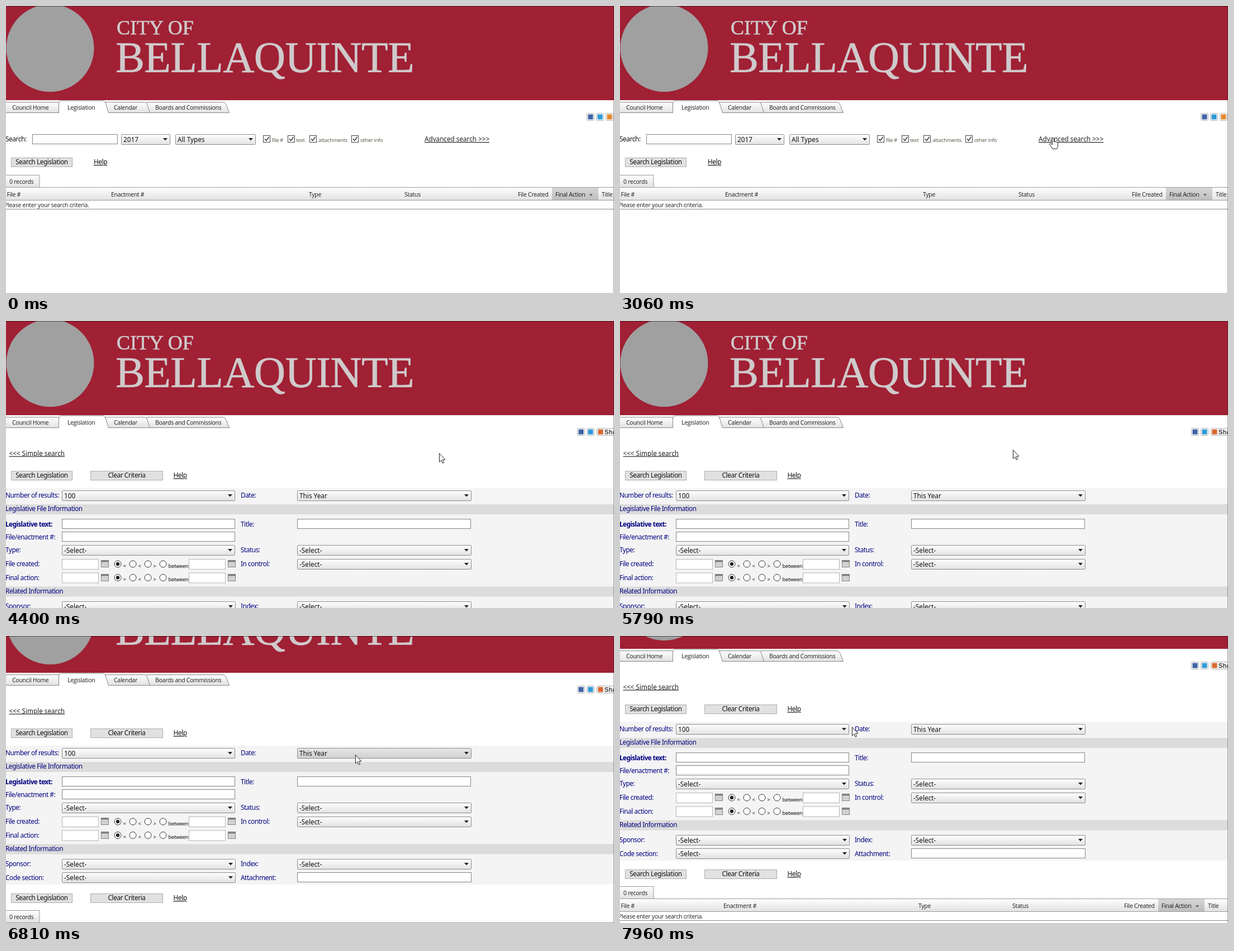
An HTML page that plays this animation: 1088 px wide and 515 px high, repeating every 8000 ms.

```html
<!DOCTYPE html>
<html lang="en">
<head>
<meta charset="utf-8">
<title>Legislation search</title>
<style>
html, body { margin: 0; width: 100%; height: 100%; overflow: hidden; background: #fff; }
svg { display: block; width: 100vw; height: 100vh; }
text { white-space: pre; }
.ui { font: 11.8px "Noto Sans", sans-serif; letter-spacing: -.033em; fill: #111; }
.label { fill: #000080; letter-spacing: -.038em; }
.bold { font-weight: 700; letter-spacing: -.05em; }
.value { letter-spacing: 0; }
.link { font-size: 11.7px; letter-spacing: 0; text-decoration: underline; fill: #222; }
.help { text-decoration: underline; }
.small { font-size: 9.4px; fill: #5c604f; }
.tiny { font-size: 9.4px; }
.mid { text-anchor: middle; }
.grid { font: 10.5px "Open Sans", sans-serif; letter-spacing: -.025em; fill: #1c1c1c; }
.banner { font-family: "Liberation Serif", serif; fill: #cfcacb; stroke: #cfcacb; stroke-width: .7; }
.share { font: 11px "Liberation Sans", sans-serif; letter-spacing: .06em; fill: #222; stroke: #222; stroke-width: .25; }
</style>
</head>
<body>
<svg id="stage" viewBox="0 0 1088 515" preserveAspectRatio="none">
  <defs>
    <linearGradient id="face" x2="0" y2="1"><stop stop-color="#fefefe"/><stop offset="1" stop-color="#e2e2e2"/></linearGradient>
    <linearGradient id="hover" x2="0" y2="1"><stop stop-color="#e6e6e6"/><stop offset="1" stop-color="#d0d0d0"/></linearGradient>
    <linearGradient id="sorted" x2="0" y2="1"><stop stop-color="#d6d6d6"/><stop offset="1" stop-color="#bebebe"/></linearGradient>
  </defs>
  <rect width="1088" height="515" fill="#fff"/>
  <g id="page">
    <g id="top"></g>
    <g id="simple"></g>
    <g id="advanced"></g>
  </g>
  <path d="M0 .5H1088" stroke="#000" stroke-opacity=".5"/>
  <path d="M1087.5 0V515" stroke="#000" stroke-opacity=".35"/>
  <g id="cursor" fill="#fff" stroke="#222" stroke-linejoin="round">
    <path id="arrow" d="M.5 .5V16L4 12.7 6.2 18 8.6 17 6.4 11.8H11z"/>
    <path id="hand" d="M-1.5 12V1.5a1.5 1.5 0 0 1 3 0V7q1.2-1 2.5 0 1.2-.7 2.4.4 1.4-.5 2.3 1V13q0 3-2 6.3H-1q-1-3.3-5-7.3-.8-2 1-2.2 2 .3 3.5 2.2z"/>
  </g>
</svg>
<script>
const $ = id => document.getElementById(id);

const text = (x, y, s, cls = 'ui') =>
  `<text x="${x}" y="${y}" class="${cls}">${s.replace(/</g, '&lt;').replace(/>/g, '&gt;')}</text>`;
const rect = (x, y, w, h, fill, stroke = 'none', extra = '') =>
  `<rect x="${x}" y="${y}" width="${w}" height="${h}" fill="${fill}" stroke="${stroke}" ${extra}/>`;
const path = (d, fill = 'none', stroke = '#888') =>
  `<path d="${d}" fill="${fill}" stroke="${stroke}"/>`;

const label = (x, y, s, cls = '') => text(x, y + 4, s, 'ui label ' + cls);
const field = (x, y, w, h = 17, stroke = '#858585') => rect(x + .5, y - 8.5, w, h, '#fff', stroke);
const caret = (x, y) => path(`M${x} ${y}h8l-4 4.5z`, '#222', 'none');
const select = (x, y, w, s, id = 'menu') =>
  rect(x + .5, y - 8.5, w, 18, 'url(#face)', '#8c8c8c', `rx="1" data-id="${id}"`) +
  text(x + 4, y + 5, s, 'ui value') + caret(x + w - 12, y - 2);
const button = (x, y, w, s) =>
  rect(x + .5, y - 7.5, w - 1, 16, '#e1e1e1', '#adadad') + text(x + w / 2, y + 4.3, s, 'ui mid');

const check = (x, s, tx) =>
  rect(x + .5, 232.5, 12, 12, '#fff', '#444') +
  `<path d="M${x + 3} 238.5l2.8 3L${x + 10.5} 235" fill="none" stroke="#222" stroke-width="1.3"/>` +
  text(tx, 244, s, 'ui small');
const radio = (x, y, s, on) =>
  `<circle cx="${x}" cy="${y}" r="6" fill="#fff" stroke="#333"/>` +
  (on ? `<circle cx="${x}" cy="${y}" r="3.2" fill="#222"/>` : '') +
  text(x + 9.5, y + 6.5, s, 'ui tiny');

const calendar = (x, y) => {
  let s = rect(x + .5, y - 6.5, 13, 12, '#f8f8f8', '#777') + rect(x + 1, y - 6, 12, 3, '#888');
  for (let i = 0; i < 12; i++)
    s += rect(x + 2 + i % 4 * 2.8, y - 1.8 + (i >> 2) * 2.3, 1.9, 1.4, '#999');
  return s;
};

const badge = (x, color, w = 13) =>
  rect(x + .5, 192.5, w, 13, '#f6f6f6', '#b5b5b5', 'rx="2"') + rect(x + 2.5, 194.5, 9, 9, color);

function grid(y, [enact, type, status, created, action, title]) {
  const head = (x, s) => text(x, y + 16, s, 'grid');
  return rect(-1, y - 22.5, 61, 22, 'url(#face)', '#999') + text(6, y - 7, '0 records', 'grid') +
    rect(-1, y - .5, 1090, 23, 'url(#face)', '#999') +
    rect(action - 6, y, 83, 22, 'url(#sorted)') +
    head(1.5, 'File #') + head(enact, 'Enactment #') + head(type, 'Type') + head(status, 'Status') +
    head(created, 'File Created') + head(action, 'Final Action') + head(title, 'Title') +
    path(`M${action + 61} ${y + 11.5}h6l-3 3.5z`, '#555', 'none') +
    text(-3, y + 35, 'Please enter your search criteria.', 'grid') +
    path(`M0 ${y + 38.5}H1088`, 'none', '#888');
}

$('top').innerHTML =
  rect(0, 0, 1088, 169, '#a02034') +
  '<circle cx="79" cy="75.5" r="78.5" fill="#a0a0a0"/>' +
  '<text x="198" y="50.5" class="banner" font-size="36">CITY OF</text>' +
  '<text x="196" y="118" class="banner" font-size="78" letter-spacing="-.7">BELLAQUINTE</text>' +
  path('M252 172.5H388q4 0 6 5L399.5 191.5H250z', 'url(#face)') +
  path('M178 172.5H247q4 0 5.5 4L257.5 191.5H180z', 'url(#face)') +
  path('M-1 172.5H92q2.5 0 2.5 3V191.5H-1z', 'url(#face)') +
  path('M94.5 192V174q0-4 4-4H174q3 0 4.5 5L183.5 192', '#fff') +
  text(11, 186, 'Council Home', 'grid') + text(110, 186, 'Legislation', 'grid') +
  text(193, 186, 'Calendar', 'grid') + text(267, 186, 'Boards and Commissions', 'grid');

$('simple').innerHTML =
  badge(1039, '#3f64a8') + badge(1056, '#2f9bd8') + badge(1073, '#e58a2c') +
  text(-1, 243, 'Search:') + field(47, 239, 152) +
  select(206, 239, 87, '2017') + select(303, 239, 143, 'All Types') +
  check(460, 'file #', 476) + check(504, 'text', 519) +
  check(543, 'attachments', 559) + check(618, 'other info', 634) +
  text(749, 243, 'Advanced search >>>', 'ui link') +
  button(9, 280, 110, 'Search Legislation') + text(157, 284.3, 'Help', 'ui help') +
  grid(326, [188, 542, 713, 916, 983, 1066]);

const buttons = y => button(9, y, 110, 'Search Legislation') +
  button(151, y, 130, 'Clear Criteria') + text(299.5, y + 4.3, 'Help', 'ui help');
const dates = (y, name) => label(-1, y, name) +
  field(100, y, 65, 18, '#b5b5b5') + field(327, y, 65, 18, '#b5b5b5') +
  radio(200, y, '=', true) + radio(227, y, '<') + radio(254, y, '>') + radio(281, y, 'between');

$('advanced').innerHTML =
  badge(1022, '#3f64a8') + badge(1039, '#2f9bd8') + badge(1057, '#d9692f', 40) +
  text(1071, 203, 'Share', 'share') +
  text(5.5, 241.5, '<<< Simple search', 'ui link') + buttons(277) +
  rect(0, 300, 1088, 249, '#f4f4f4') +
  rect(0, 329, 1088, 18, '#dcdcdc') + rect(0, 476.5, 1088, 18, '#dcdcdc') +
  label(-1, 313, 'Number of results:') + select(100, 313, 309, '100') +
  label(420, 313, 'Date:') + select(521, 313, 311, 'This Year', 'date') +
  label(-1, 337, 'Legislative File Information') +
  label(-1, 364.5, 'Legislative text:', 'bold') + field(100, 364, 309) +
  label(420, 364.5, 'Title:') + field(521, 364, 310) +
  label(-1, 387.5, 'File/enactment #:') + field(100, 387, 309) +
  label(-1, 411, 'Type:') + select(100, 411, 309, '-Select-') +
  label(420, 411, 'Status:') + select(521, 411, 311, '-Select-') +
  dates(436, 'File created:') + label(420, 436, 'In control:') + select(521, 436, 311, '-Select-') +
  dates(460.5, 'Final action:') +
  label(-1, 484.5, 'Related Information') +
  label(-1, 512, 'Sponsor:') + select(100, 512, 310, '-Select-') +
  label(420, 512, 'Index:') + select(521, 512, 311, '-Select-') +
  label(-1, 536.5, 'Code section:') + select(100, 536, 310, '-Select-') +
  label(420, 536.5, 'Attachment:') + field(521, 536, 311) +
  buttons(573) + grid(618, [185, 534, 702, 902, 969, 1052]) +
  '<g id="icons">' + [436, 461].map(y => calendar(170, y) + calendar(397, y)).join('') + '</g>';

const dateMenu = document.querySelector('[data-id=date]');

// Moves: start ms, end ms, steps, then pointer x, y and page scroll reached
const START = [1013, 514, 0];
const MOVES = [
  [250, 710, 7, 587, 235, 0],
  [880, 1180, 5, 653, 220, 0],
  [1260, 1640, 6, 752, 234, 0],
  [1730, 2270, 8, 775, 237, 0],
  [5240, 5380, 3, 705, 232, 0],
  [5700, 5790, 2, 703, 231, 0],
  [6010, 6170, 3, 703, 231, 40],
  [6340, 6340, 1, 703, 231, 46],
  [6420, 6810, 6, 625, 213, 103],
  [6890, 7120, 4, 549, 208, 124],
  [7200, 7270, 2, 482, 190, 124],
  [7510, 7960, 7, 415, 163, 146]
];

function pose(t) {
  let from = START;
  for (const [t0, t1, n, ...to] of MOVES) {
    if (t < t0) break;
    const step = t >= t1 ? n : 1 + Math.floor((t - t0) / (t1 - t0) * (n - 1));
    from = from.map((v, i) => Math.round(v + (to[i] - v) * step / n));
    if (step < n) break;
  }
  return from;
}

const show = (id, on) => $(id).setAttribute('display', on ? 'inline' : 'none');

function draw(t) {
  const [x, y, scroll] = pose(t);
  const loading = t >= 3990 && t < 4220;
  const onLink = t >= 1640 && t < 4070;
  show('page', !loading);
  show('simple', t < 3990);
  show('advanced', t >= 4220);
  show('icons', t >= 4400);
  show('cursor', t >= 250);
  show('hand', onLink);
  show('arrow', !onLink);
  $('page').setAttribute('transform', `translate(0 ${-scroll})`);
  $('cursor').setAttribute('transform', `translate(${x} ${y})`);
  const overDate = x > 521 && x < 832 && Math.abs(y + scroll - 313) < 9;
  dateMenu.setAttribute('fill', overDate ? 'url(#hover)' : 'url(#face)');
}

function tick() {
  draw(performance.now() % 8000);
  requestAnimationFrame(tick);
}
tick();
</script>
</body>
</html>
```
